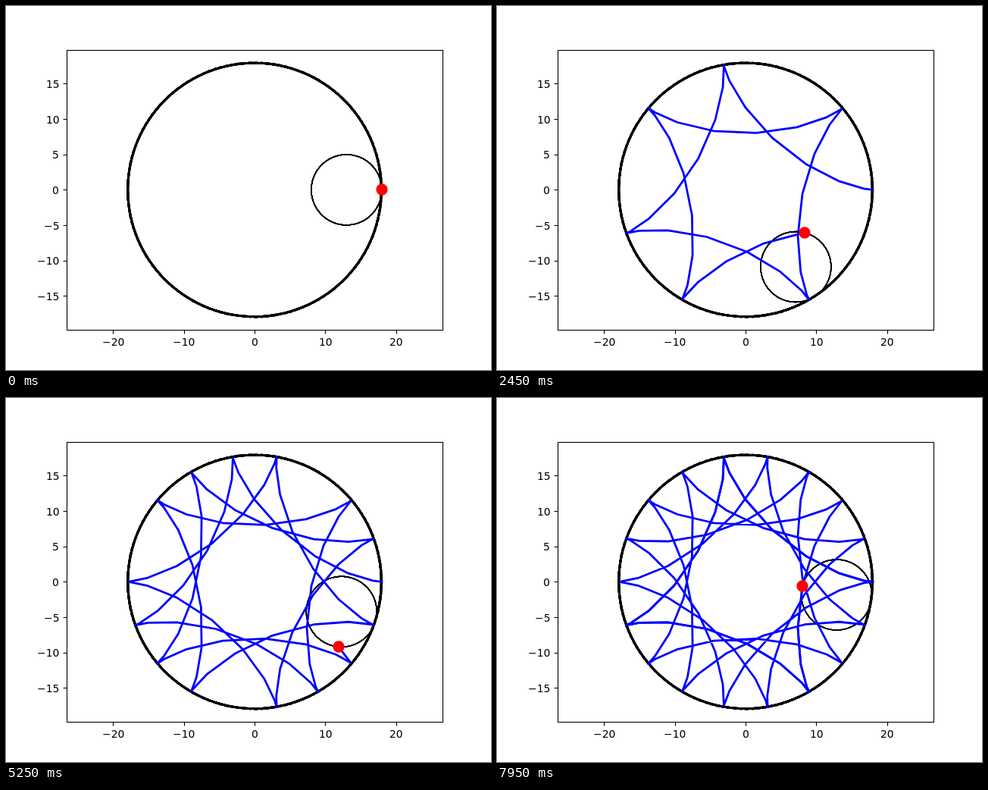
An HTML page with a canvas for the animation above (8000 ms loop, 640 by 480 pixels).

```html
<!DOCTYPE html>
<html lang="en">
<head>
<meta charset="utf-8">
<title>Hypocycloid</title>
<style>
  html, body { margin: 0; width: 100%; height: 100%; overflow: hidden; background: #fff; }
  canvas { display: block; }
</style>
</head>
<body>
<canvas id="stage" width="640" height="480"></canvas>
<script>
const ctx = document.getElementById('stage').getContext('2d');

const PT = 100 / 72;             // one point in pixels
const BIG = 18, SMALL = 5, ARM = BIG - SMALL;
const SAMPLES = 399;             // chords over 15 turns
const STEP = 30 * Math.PI / SAMPLES;
const CYCLE = 133;               // steps until the curve closes
const FRAME_MS = 50, FRAMES = 160;

const SCALE = 369.6 / 39.6;
const px = x => 328 + x * SCALE;
const py = y => 242.4 - y * SCALE;

function penAt(i) {
  const t = i * STEP, u = t * ARM / SMALL;
  return [ARM * Math.cos(t) + SMALL * Math.cos(u), ARM * Math.sin(t) - SMALL * Math.sin(u)];
}

function polyline(from, to, pointAt) {
  ctx.beginPath();
  for (let i = from; i <= to; i++) {
    const [x, y] = pointAt(i);
    ctx.lineTo(px(x), py(y));
  }
  ctx.stroke();
}

// A coarse circle traced 15 times; one stroke per turn so that edges build up.
function circle(cx, cy, r, width) {
  const pointAt = i => [cx + r * Math.cos(i * STEP), cy + r * Math.sin(i * STEP)];
  const turn = 26;
  ctx.strokeStyle = '#000';
  ctx.lineWidth = width * PT;
  ctx.lineCap = 'butt';
  for (let i = 0; i < SAMPLES; i += turn) polyline(i, Math.min(i + turn, SAMPLES), pointAt);
}

function trail(n) {
  ctx.strokeStyle = '#00f';
  ctx.lineWidth = 2 * PT;
  ctx.lineCap = 'square';
  if (n > 0) polyline(0, Math.min(n, CYCLE), penAt);
  if (n > CYCLE) polyline(CYCLE, n, penAt);
}

function dot(n) {
  const [x, y] = penAt(n);
  ctx.fillStyle = '#f00';
  ctx.beginPath();
  ctx.arc(Math.round(px(x)), Math.round(py(y)), 5.5 * PT, 0, 2 * Math.PI);
  ctx.fill();
}

function line(x1, y1, x2, y2) {
  ctx.beginPath();
  ctx.moveTo(x1, y1);
  ctx.lineTo(x2, y2);
  ctx.stroke();
}

function axes() {
  ctx.strokeStyle = ctx.fillStyle = '#000';
  ctx.lineWidth = 0.8 * PT;
  ctx.lineCap = 'butt';
  ctx.font = 10 * PT + 'px "DejaVu Sans", sans-serif';
  ctx.strokeRect(80.5, 58.5, 496, 369);
  const label = v => String(v).replace('-', '\u2212');
  const write = (text, x, y, share) =>
    ctx.fillText(text, Math.round(x - ctx.measureText(text).width * share), Math.round(y));
  for (let v = -20; v <= 20; v += 10) {
    const x = Math.round(px(v)) + 0.5;
    line(x, 427.5, x, 432.5);
    write(label(v), px(v), 448, 0.5);
  }
  for (let v = -15; v <= 15; v += 5) {
    const y = Math.round(py(v)) + 0.5;
    line(75.5, y, 80.5, y);
    write(label(v), 80 - 7 * PT, py(v) + 5.5, 1);
  }
}

function draw(n) {
  ctx.fillStyle = '#fff';
  ctx.fillRect(0, 0, 640, 480);
  ctx.lineJoin = 'round';
  circle(0, 0, BIG, 1.5);
  circle(ARM * Math.cos(n * STEP), ARM * Math.sin(n * STEP), SMALL, 0.8);
  trail(n);
  dot(n);
  ctx.lineJoin = 'miter';
  axes();
}

let start = null, shown = -1;
function tick(now) {
  if (start === null) start = now;
  const n = Math.floor((now - start) / FRAME_MS) % FRAMES;
  if (n !== shown) draw(shown = n);
  requestAnimationFrame(tick);
}
draw(0);
requestAnimationFrame(tick);
</script>
</body>
</html>
```
